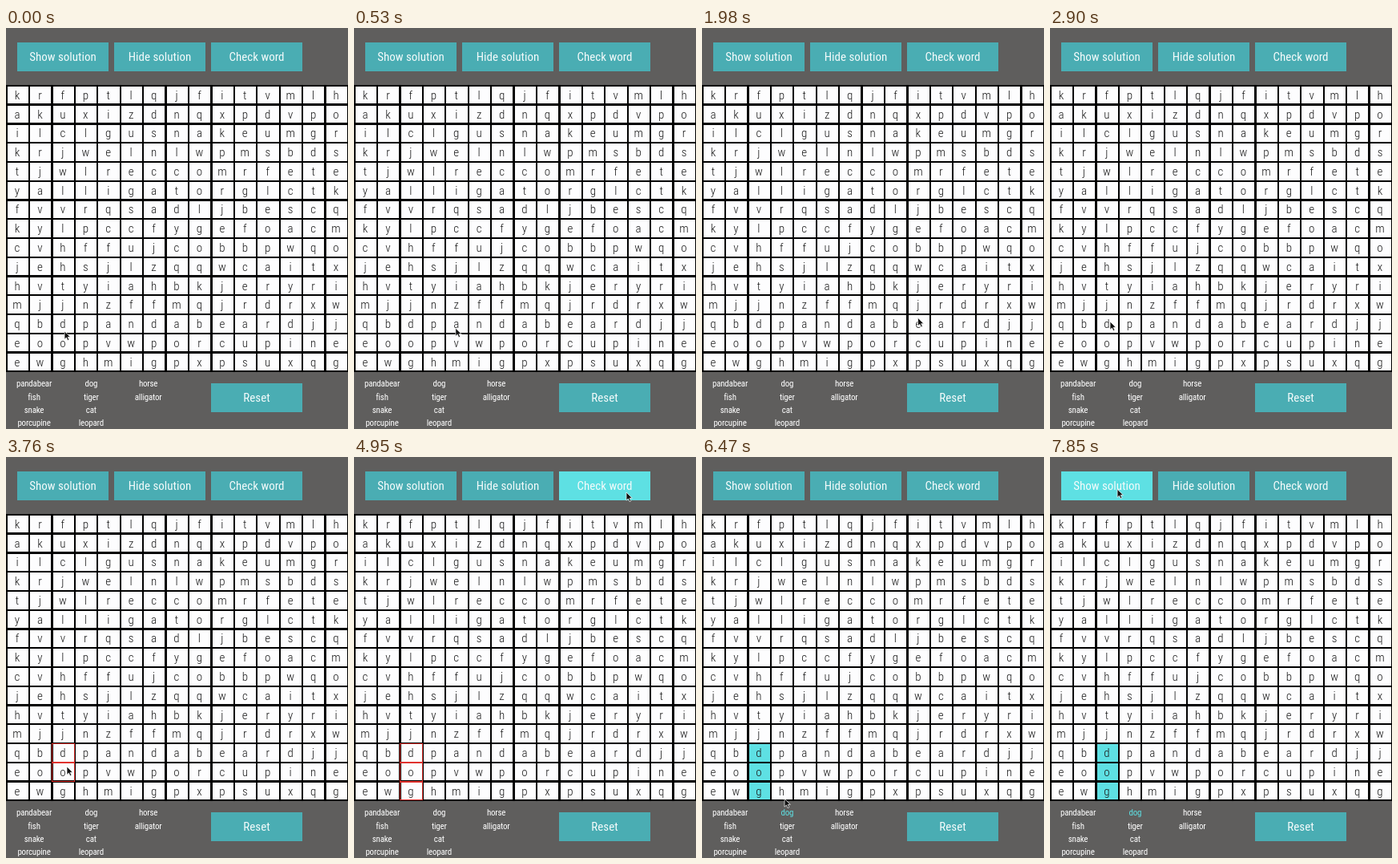
Write an HTML page that moves like this. It is 427x500 px and loops after 7.99 s.

```html
<!DOCTYPE html>
<html lang="en">
<head>
<meta charset="utf-8">
<title>Word search</title>
<style>
html, body { margin: 0; width: 100%; height: 100%; overflow: hidden; background: #5f5e5d; }
svg { display: block; width: 100%; height: 100%; }
text { font-family: "Roboto Condensed", Roboto, sans-serif; font-stretch: 75%; text-anchor: middle; }
rect { shape-rendering: crispEdges; }
.btn text { font-size: 15px; fill: #f4fbfb; }
.cell text { font-size: 15px; font-weight: 300; fill: #1c1c1c; }
.word { font-size: 11px; letter-spacing: -0.2px; fill: #fff; }
</style>
</head>
<body>
<svg id="stage" viewBox="0 0 427 500"></svg>
<script>
const LOOP = 7990;
const COL = 28.43, ROW = 23.77, TOP = 71.7;
const TEAL = '#4aadb3', BRIGHT = '#5ee0e3', WHITE = '#fdfdfe', RED = '#e0322e';
const LETTERS = `krfptlqjfitvmlh akuxizdnqxpdvpo ilclgusnakeumgr
krjwelnlwpmsbds tjwlreccomrfete yalligatorglctk fvvrqsadljbescq
kylpccfygefoacm cvhffujcobbpwqo jehsjlzqqwcaitx hvtyiahbkjeryri
mjjnzffmqjrdrxw qbdpandabeardjj eoopvwporcupine ewghmigpxpsuxqg`.split(/\s+/);
const WORDS = [
  ['pandabear', 'fish', 'snake', 'porcupine'],
  ['dog', 'tiger', 'cat', 'leopard'],
  ['horse', 'alligator']
];

const stage = document.getElementById('stage');

function add(parent, tag, attrs, content = '') {
  const el = document.createElementNS('http://www.w3.org/2000/svg', tag);
  for (const key in attrs) el.setAttribute(key, attrs[key]);
  el.textContent = content;
  parent.appendChild(el);
  return el;
}

function button(x, y, label) {
  const g = add(stage, 'g', { class: 'btn' });
  const face = add(g, 'rect', { x, y, width: 114, height: 36, fill: TEAL });
  add(g, 'text', { x: x + 57, y: y + 23.3 }, label);
  return face;
}

add(stage, 'rect', { width: 427, height: 500, fill: '#5f5e5d' });
const show = button(14, 18, 'Show solution');
button(135, 18, 'Hide solution');
const check = button(256, 18, 'Check word');
button(256, 443, 'Reset');

add(stage, 'rect', { y: 71, width: 427, height: 358, fill: '#000' });
const board = add(stage, 'g', { class: 'cell' });
const cells = LETTERS.map((line, r) => [...line].map((letter, c) => {
  const x = c * COL, y = TOP + r * ROW;
  const face = add(board, 'rect', {
    x: x + 1.7, y: y + 1.3, width: COL - 2.3, height: ROW - 2.3, fill: WHITE
  });
  add(board, 'text', { x: x + 14, y: y + 17.1 }, letter);
  return face;
}));

const labels = WORDS.map((list, c) => list.map((word, r) =>
  add(stage, 'text', { class: 'word', x: 35 + c * 71.3, y: 447.2 + r * 16.4 }, word)));
const dogLabel = labels[1][0];

// The three cells of "dog", picked one after another
const dog = [0, 1, 2].map(i => ({
  at: 3040 + i * 480,
  face: cells[12 + i][2],
  frame: add(stage, 'rect', {
    x: 2 * COL + 1, y: TOP + (12 + i) * ROW + 0.6,
    width: COL - 1, height: ROW - 1, fill: 'none', stroke: RED
  })
}));

const pointer = add(stage, 'path', {
  d: 'M0 0V10.2L2.4 8L4 11.6L5.8 10.8L4.2 7.3H7.3Z',
  fill: '#111', stroke: '#fff', 'stroke-width': 0.7
});

// Pointer moves: start, end, target x and y
const HOME = [73, 378];
const MOVES = [
  [70, 1620, 326, 360],
  [1720, 2570, 75, 366],
  [3370, 3700, 76, 386],
  [3800, 4030, 73, 412],
  [4420, 4930, 340, 44],
  [5350, 6200, 103, 426],
  [7000, 7880, 84, 39]
];

const ease = k => k * k * (3 - 2 * k);

function pointerAt(t) {
  let [x, y] = HOME;
  for (const [start, end, toX, toY] of MOVES) {
    const k = ease(Math.min(1, Math.max(0, (t - start) / (end - start))));
    x += (toX - x) * k;
    y += (toY - y) * k;
  }
  return [x, y];
}

const inside = (x, y, left) => x >= left && x < left + 114 && y >= 18 && y < 54;

function draw(t) {
  const [x, y] = pointerAt(t);
  const solved = t >= 5280;
  pointer.setAttribute('transform', `translate(${x} ${y})`);
  show.setAttribute('fill', inside(x, y, 14) ? BRIGHT : TEAL);
  check.setAttribute('fill', inside(x, y, 256) ? BRIGHT : TEAL);
  for (const { at, face, frame } of dog) {
    frame.setAttribute('visibility', t >= at && !solved ? 'visible' : 'hidden');
    face.setAttribute('fill', solved ? BRIGHT : WHITE);
  }
  dogLabel.style.fill = solved ? BRIGHT : '#fff';
}

const start = performance.now();
function tick() {
  draw((performance.now() - start) % LOOP);
  requestAnimationFrame(tick);
}
tick();
</script>
</body>
</html>
```
